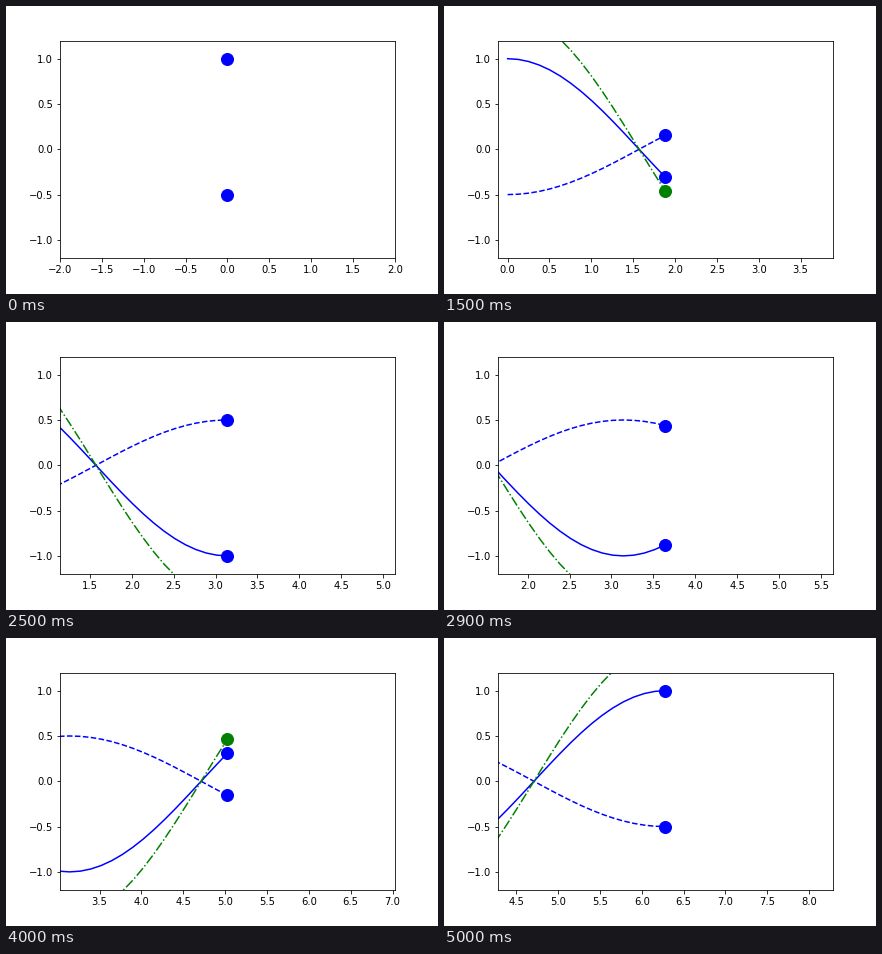
Animation of 432x288 px, one loop 5100 ms. Source, as a matplotlib script:

```python
import numpy as np
import matplotlib.pyplot as plt
from matplotlib.animation import FuncAnimation

FRAMES = 51
INTERVAL = 100  # ms

# amplitude, colour, line style
WAVES = [(1.0, "b", "-"), (-0.5, "b", "--"), (1.5, "g", "-.")]

plt.rcParams["font.family"] = "DejaVu Sans"

xs = np.linspace(0, 2 * np.pi, FRAMES)

fig, ax = plt.subplots(figsize=(6, 4), dpi=72)
fig.subplots_adjust(left=0.125, right=0.9, bottom=0.125, top=0.88)
ax.set_ylim(-1.2, 1.2)

trails = [ax.plot([], [], color=c, linestyle=s, linewidth=1.5)[0]
          for _, c, s in WAVES]
dots = [ax.plot([], [], "o", color=c, markersize=12)[0]
        for _, c, _ in WAVES]


def draw(i):
    x = xs[:i + 1]
    for (amp, _, _), trail, dot in zip(WAVES, trails, dots):
        y = amp * np.cos(x)
        trail.set_data(x, y)
        dot.set_data(x[-1:], y[-1:])
    # the view follows the dots
    ax.set_xlim(x[-1] - 2, x[-1] + 2)
    return trails + dots


anim = FuncAnimation(fig, draw, frames=FRAMES, init_func=lambda: draw(0),
                     interval=INTERVAL, repeat=True, repeat_delay=0,
                     blit=False)

plt.show()
```
